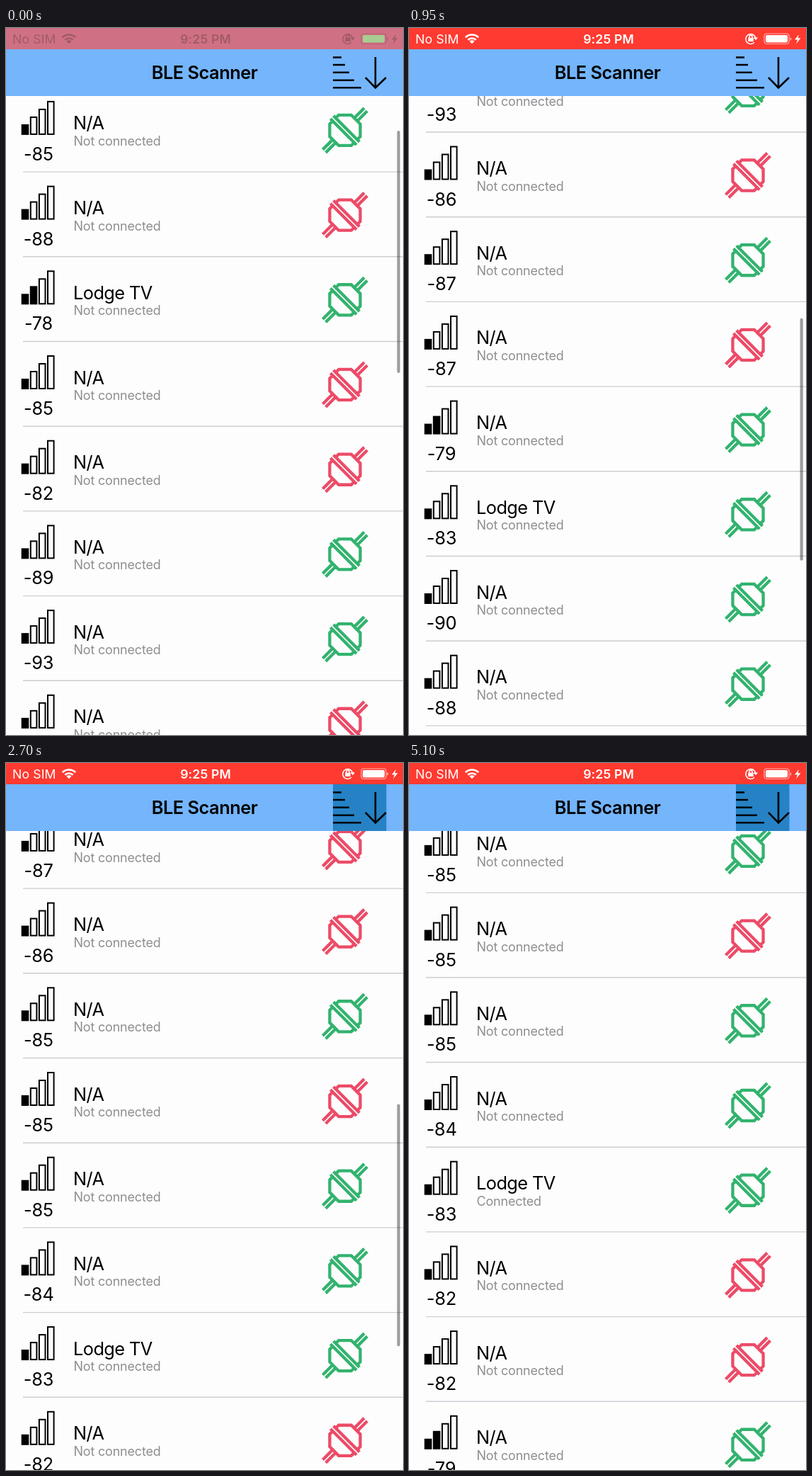
Write an HTML page that moves like this. It is 561x998 px and loops after 5150 ms.

```html
<!DOCTYPE html>
<html lang="en">
<head>
<meta charset="utf-8">
<title>BLE Scanner</title>
<style>
  html, body { margin: 0; width: 100%; height: 100%; overflow: hidden; background: #fefdfe; }
  svg { display: block; width: 100%; height: 100%; }
  text { font: 25.4px Inter, Roboto, sans-serif; letter-spacing: -.6px; }
  .state { font-size: 18px; letter-spacing: -.2px; fill: #8e8e90; }
  .level { letter-spacing: -.2px; text-anchor: middle; }
  .heading { font-weight: 600; letter-spacing: -.5px; text-anchor: middle; }
  .small { font-size: 17.7px; letter-spacing: .1px; }
  .line { fill: none; stroke: #000; }
</style>
</head>
<body>
<svg viewBox="0 0 561 998" preserveAspectRatio="none">
  <defs>
    <g id="plug" transform="rotate(-45)" fill="none" stroke="currentColor" stroke-width="4.3">
      <path id="half" d="M3 -21.5H9L21.5 -9V9L9 21.5H3M3 -26V26M21 -3H41.5M21 3H41.5"/>
      <use href="#half" transform="scale(-1 1)"/>
    </g>
  </defs>

  <g id="list">
    <g id="unsorted"></g>
    <g id="sorted"></g>
  </g>
  <rect id="thumb" x="552.6" width="4.2" height="342" rx="2.1" fill="#000"/>

  <rect y="30" width="561" height="66" fill="#74b5fc"/>
  <rect id="pressed" x="462" y="30" width="75.5" height="66" fill="#2682c4"/>
  <text class="heading" x="280.5" y="72">BLE Scanner</text>
  <path class="line" stroke-width="2.6"
    d="M462 41.5H474M462 52H479M462 62.8H485M462 73.7H492M462 84.3H502M522 41V84M508 70L522 84.5L537 70"/>

  <rect id="status" width="561" height="30"/>
  <g id="ink" fill="currentColor">
    <text class="small" x="9" y="22">No SIM</text>
    <text class="small heading" x="282" y="22">9:25 PM</text>
    <g fill="none" stroke="currentColor" stroke-width="2.6">
      <path d="M79.8 13.2A13.2 13.2 0 0 1 98.2 13.2M83.3 16.8A8.2 8.2 0 0 1 94.7 16.8"/>
      <path stroke-width="1.6" d="M488 20.3A7 7 0 1 1 489.8 14.5M487.5 13.5L490 16L492 13.2M480.8 14V12.6A2.2 2.2 0 0 1 485.2 12.6V14"/>
      <rect x="502" y="8" width="35" height="14.5" rx="3.5" stroke-width="1.2" opacity=".6"/>
    </g>
    <path d="M85.5 18.8A5 5 0 0 1 92.5 18.8L89 22.3ZM479.3 13.8H486.7V19H479.3ZM551 9L545 16.5H549L547 22.5L553.5 14.2H549.5Z"/>
    <path d="M538.5 13V18A2.6 2.6 0 0 0 538.5 13Z" opacity=".6"/>
  </g>
  <rect id="battery" x="504" y="10" width="31" height="10.5" rx="2"/>
</svg>

<script>
const LOOP = 5150, STEP = 50, ROW = 119.7, TOP = 83.4;
const SORT_AT = 1950, CONNECTING_AT = 3950, CONNECTED_AT = 5100;
const $ = id => document.getElementById(id);
const clamp = x => Math.min(1, Math.max(0, x));
const TV = 'Lodge TV';

// Signal level, plug colour (g or r) and an optional name.
const found = ['-85 g', '-88 r', '-78 g ' + TV, '-85 r', '-82 r', '-89 g', '-93 g', '-86 r', '-87 g', '-87 r',
  '-79 g', '-83 g ' + TV, '-90 g', '-88 g', '-84 g', '-81 g K47Q2'];
const byLevel = ['-87 r', '-86 r', '-85 g', '-85 r', '-85 g', '-84 g', '-83 g ' + TV, '-82 r', '-82 r', '-79 g'];

function bars(level) {
  const filled = level >= -79 ? 2 : 1;
  return [13, 24, 35, 46].map((h, i) =>
    `<rect class="line" x="${22.7 + i * 12.1}" y="${66.5 - h}" width="8.6" height="${h}"
      stroke-width="2" ${i < filled ? 'style="fill:#000"' : ''}/>`).join('');
}

function fillList(group, devices, first) {
  group.innerHTML = devices.map((device, i) => {
    const [level, tone, ...name] = device.split(' ');
    return `<g transform="translate(0 ${TOP + (first + i) * ROW})">
      ${bars(+level)}
      <text class="level" x="46" y="103.5">${level}</text>
      <text x="95" y="60">${name.join(' ') || 'N/A'}</text>
      <text class="state" x="95.5" y="82.5">Not connected</text>
      <use href="#plug" x="479" y="61" color="${tone === 'g' ? '#32b36e' : '#ec4b67'}"/>
      <path d="M24 ${ROW}H561" stroke="#cdccd1" stroke-width="1.4"/>
    </g>`;
  }).join('');
}
fillList($('unsorted'), found, 0);
fillList($('sorted'), byLevel, 8);
const tvState = $('sorted').children[6].querySelector('.state');

// Scroll keys: time, offset, speed in px/ms.
const keys = [[0, 0, .8], [300, 229, .65], [700, 489, 1], [1200, 934.6, 0],
  [2650, 934.6, 0], [2700, 983.6, 1], [3150, 1217, 0], [LOOP, 1217, 0]];

function scrollAt(t) {
  const i = keys.findIndex(key => t < key[0]);
  const [t0, y0, v0] = keys[i - 1], [t1, y1, v1] = keys[i];
  const d = t1 - t0, u = (t - t0) / d, w = 1 - u;
  return y0 * w * w * (1 + 2 * u) + y1 * u * u * (3 - 2 * u) + d * u * w * (v0 * w - v1 * u);
}

function thumbOpacity(t) {
  if (t < 2700) return 1 - clamp((t - 1450) / 250);
  return 1 - clamp((t - 3200) / 200);
}

const mix = (from, to, amount) => `color-mix(in srgb, ${to} ${amount * 100}%, ${from})`;

function draw(t) {
  const scroll = scrollAt(t), sorted = t >= SORT_AT;
  $('list').setAttribute('transform', `translate(0 ${-scroll})`);
  $('unsorted').style.display = sorted ? 'none' : '';
  $('sorted').style.display = $('pressed').style.display = sorted ? '' : 'none';
  $('thumb').setAttribute('y', 145 + scroll * .342);
  $('thumb').style.opacity = .38 * thumbOpacity(t);
  tvState.textContent = t >= CONNECTED_AT ? 'Connected' : t >= CONNECTING_AT ? 'Connecting...' : 'Not connected';

  const lit = clamp(t / 250);
  $('status').style.fill = mix('#d07084', '#ff3a30', lit);
  $('ink').style.color = mix('#a05c66', '#ffffff', lit);
  $('battery').style.fill = mix('#a8cc92', '#ffffff', lit);
}

const start = performance.now();
function tick() {
  const t = (performance.now() - start) % LOOP;
  draw(Math.floor(t / STEP) * STEP);
  requestAnimationFrame(tick);
}
tick();
</script>
</body>
</html>
```
